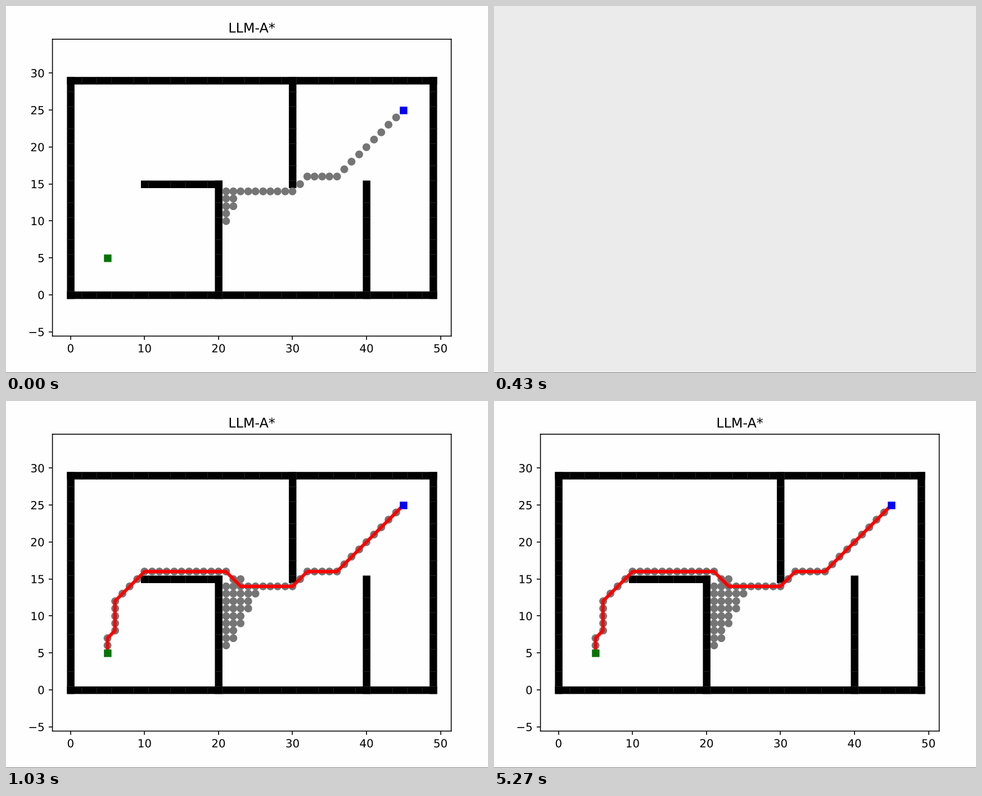
Write a matplotlib script that moves like this. It is 857 px wide and 653 px high and loops after 7.6 s.

```python
import numpy as np
import matplotlib.pyplot as plt
from matplotlib.animation import FuncAnimation
from matplotlib.collections import PatchCollection
from matplotlib.patches import Circle, Rectangle
from matplotlib.patheffects import Normal

W, H, DPI = 857, 653, 143
LOOP, STEP_MS = 7600, 25
PAPER, BLANK = "#fefefe", "#ebebeb"
GREY, GREEN, BLUE, RED = "#757575", "#007500", "#0000fc", "#ff0000"

# Axes box in pixels, measured from the top left
LEFT, RIGHT, TOP, BOTTOM = 82.6, 791.6, 59.15, 587.35

# Grid of the maze, with a margin of 5 % on either side
NX, NY = 49, 29
SPAN = 1.1 * NX
SPAN_Y = SPAN * (BOTTOM - TOP) / (RIGHT - LEFT)

# Cells sit on a finer raster, so some neighbours are one unit further apart
CELL = 992 / SPAN
X0 = 160 + 0.05 * NX * CELL
Y0 = 484.8 + NY / 2 * CELL
HALF, RADIUS = 9.39 / CELL, 9.72 / CELL


def cx(i, shift=0.5):
    return (np.round(X0 + CELL * i) + shift - X0) / CELL


def cy(j, shift=0.5):
    return (Y0 - np.round(Y0 - CELL * j) - shift) / CELL


def block(x0, y0, x1, y1, color="black", z=2):
    """Fill the cells from (x0, y0) to (x1, y1)."""
    left, low = cx(x0) - HALF, cy(y0) - HALF
    ax.add_patch(Rectangle((left, low), cx(x1) + HALF - left,
                           cy(y1) + HALF - low, fc=color, lw=0,
                           snap=False, zorder=z))


def joints(pos):
    """Midpoints between neighbours that do not quite meet."""
    wide = np.diff(pos) > 18.5 / CELL
    return ((pos[1:] + pos[:-1]) / 2)[wide]


def wall(x0, y0, x1, y1):
    block(x0, y0, x1, y1)
    style = dict(color="#1c1c1c", lw=0.7, zorder=2.5, snap=False)
    if y0 == y1:
        ax.vlines(joints(cx(np.arange(x0, x1 + 1))),
                  cy(y0) - HALF, cy(y0) + HALF, **style)
    else:
        ax.hlines(joints(cy(np.arange(y0, y1 + 1))),
                  cx(x0) - HALF, cx(x0) + HALF, **style)


def walk(corners):
    """Every cell on the way, one king's move at a time."""
    cells = set()
    for (x0, y0), (x1, y1) in zip(corners, corners[1:]):
        n = max(abs(x1 - x0), abs(y1 - y0))
        cells |= {(x0 + (x1 - x0) * k // n, y0 + (y1 - y0) * k // n)
                  for k in range(n + 1)}
    return cells


def dots(cells):
    group = PatchCollection([Circle((cx(x, 0), cy(y, 0)), RADIUS)
                             for x, y in sorted(cells)],
                            facecolor=GREY, linewidth=0, zorder=3)
    ax.add_collection(group, autolim=False)
    return group


plt.rcParams["font.family"] = "DejaVu Sans"
fig = plt.figure(figsize=((W + 1e-4) / DPI, (H + 1e-4) / DPI), dpi=DPI,
                 facecolor=PAPER)
ax = fig.add_axes([LEFT / W, 1 - BOTTOM / H, (RIGHT - LEFT) / W,
                   (BOTTOM - TOP) / H], facecolor=PAPER)
for spine in ax.spines.values():
    spine.set_snap(False)

# Bounds, then inner walls
for y in (0, NY):
    wall(0, y, NX, y)
for x in (0, NX):
    wall(x, 0, x, NY)
for x in (20, 40):
    wall(x, 0, x, 15)
wall(10, 15, 20, 15)
wall(30, 15, 30, NY)

START, GOAL = (5, 5), (45, 25)
ROUTE = [START, (5, 7), (6, 8), (6, 12), (10, 16), (21, 16), (23, 14),
         (30, 14), (32, 16), (36, 16), GOAL]
way = walk(ROUTE) - {START, GOAL}

# The search runs back from the goal and fills a wedge beside the wall
first = {c for c in way if c[0] >= 23}
first |= {(x, y) for y in range(10, 15) for x in range(21, 22 + (y >= 12))}
wedge = {(x, y) for y in range(6, 15) for x in range(21, 22 + (y - 5) // 2)}
later = (way | wedge | {(23, 15)}) - first

dots(first)
rest = dots(later)
route, = ax.plot(*zip(*ROUTE), color=RED, lw=3, zorder=4, snap=False)
block(*START, *START, GREEN, 5)
block(*GOAL, *GOAL, BLUE, 5)

ax.set_xlim((NX - SPAN) / 2, (NX + SPAN) / 2)
ax.set_ylim((NY - SPAN_Y) / 2, (NY + SPAN_Y) / 2)
ax.set_xticks(range(0, 51, 10))
ax.set_yticks(range(-5, 31, 5))
title = ax.set_title("LLM-A*")

# Path effects draw the glyphs as outlines, free of the pixel grid
for label in [title, *ax.get_xticklabels(), *ax.get_yticklabels()]:
    label.set_path_effects([Normal()])

# Thin edge along the bottom of the stage
fig.add_artist(Rectangle((0, 0), 1, 1 / H, transform=fig.transFigure,
                         fc="#808080", lw=0, zorder=10))


def update(n):
    t = n * STEP_MS + 5
    blank = 430 <= t < 530
    ax.set_visible(not blank)
    fig.set_facecolor(BLANK if blank else PAPER)
    rest.set_visible(t >= 100)
    route.set_visible(t >= 530)
    return rest, route


anim = FuncAnimation(fig, update, frames=LOOP // STEP_MS, interval=STEP_MS,
                     repeat=True, repeat_delay=0, blit=False)
plt.show()
```
